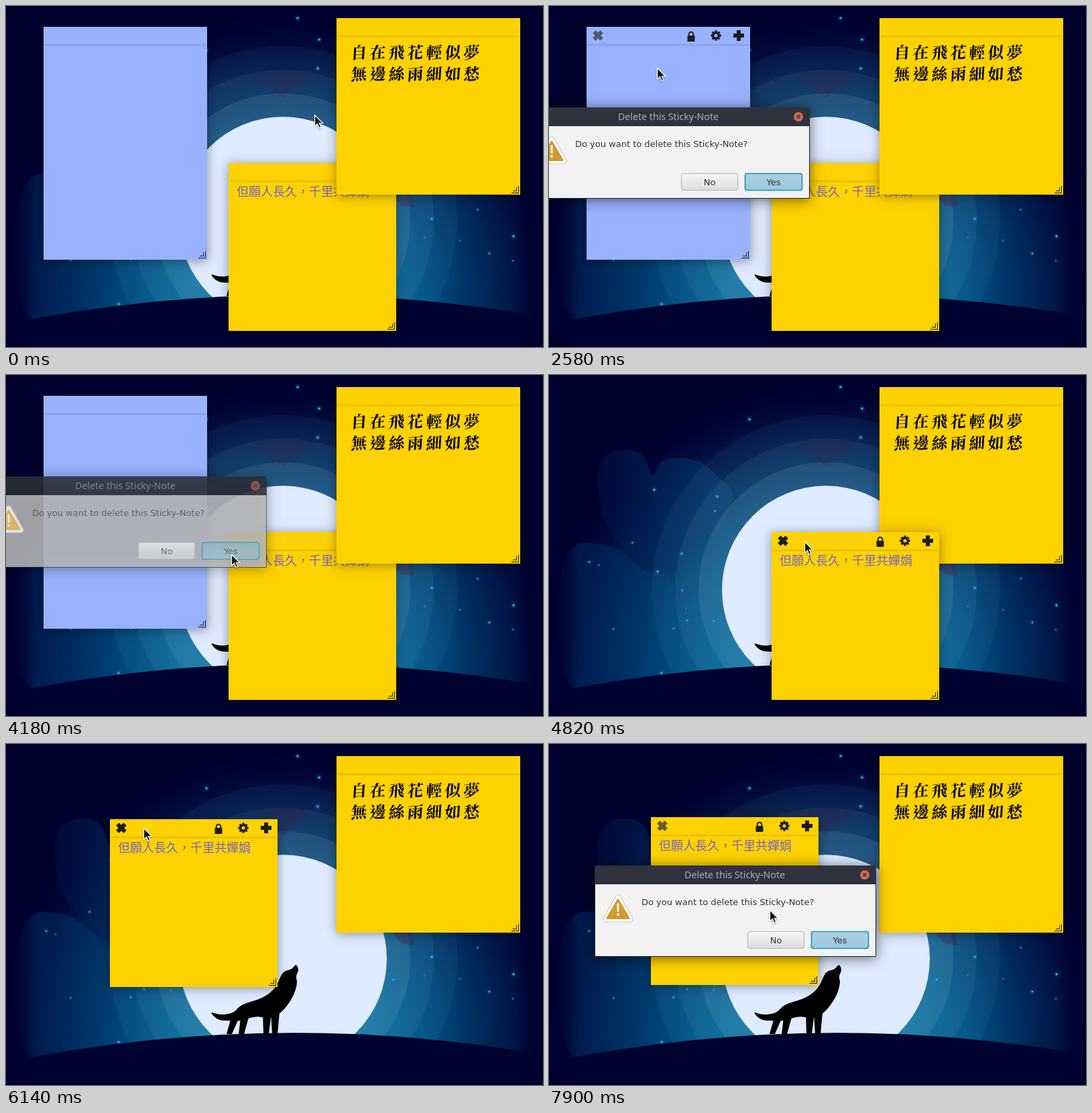
An HTML page with a canvas that plays this animation: 801x508 px, repeating every 8000 ms.

```html
<!DOCTYPE html>
<html lang="zh-Hant">
<head>
<meta charset="utf-8">
<title>Sticky notes</title>
<style>
html, body { margin: 0; width: 100%; height: 100%; overflow: hidden; background: #00002e; }
canvas { display: block; }
</style>
</head>
<body>
<canvas id="stage" width="801" height="508"></canvas>
<script>
const W = 801, H = 508, LOOP = 8000, INK = '#1d1d21', YELLOW = '#fed200';
const ctx = document.getElementById('stage').getContext('2d');

const clamp = v => Math.max(0, Math.min(1, v));
const ramp = (t, a, b) => clamp((t - a) / (b - a));
const ease = k => k * k * (3 - 2 * k);

// Each move is [start, end, x, y]; between moves the point rests
function follow([x, y], moves, t) {
  for (const [a, b, tx, ty] of moves) {
    const k = ease(ramp(t, a, b));
    x += (tx - x) * k;
    y += (ty - y) * k;
  }
  return [Math.round(x), Math.round(y)];
}

function randomizer(seed) {
  return () => (seed = (seed * 16807) % 2147483647) / 2147483647;
}

function poly(c, pts, fill) {
  c.beginPath();
  pts.forEach(([x, y]) => c.lineTo(x, y));
  c.closePath();
  c.fillStyle = fill;
  c.fill();
}

// Closed curve through the midpoints of the given corners
function blob(c, pts, fill) {
  const mid = (a, b) => [(a[0] + b[0]) / 2, (a[1] + b[1]) / 2];
  c.beginPath();
  c.moveTo(...mid(pts[pts.length - 1], pts[0]));
  pts.forEach((p, i) => c.quadraticCurveTo(...p, ...mid(p, pts[(i + 1) % pts.length])));
  c.fillStyle = fill;
  c.fill();
}

function disc(c, x, y, r, fill) {
  c.beginPath();
  c.arc(x, y, r, 0, Math.PI * 2);
  c.fillStyle = fill;
  c.fill();
}

function box(x, y, w, h, r, fill, stroke, line = 1) {
  ctx.beginPath();
  ctx.roundRect(x, y, w, h, r);
  ctx.fillStyle = fill;
  ctx.fill();
  if (!stroke) return;
  ctx.strokeStyle = stroke;
  ctx.lineWidth = line;
  ctx.stroke();
}

// Spread the colours evenly over a gradient
function blend(g, ...colors) {
  colors.forEach((col, i) => g.addColorStop(i / (colors.length - 1), col));
  return g;
}

function text(str, x, y, font, fill, align = 'left') {
  ctx.font = font;
  ctx.fillStyle = fill;
  ctx.textAlign = align;
  ctx.fillText(str, x, y);
}

function shadowed(alpha, blur, draw) {
  ctx.save();
  ctx.shadowColor = `rgba(0,0,0,${alpha})`;
  ctx.shadowBlur = blur;
  ctx.shadowOffsetY = 2;
  draw();
  ctx.restore();
}

function paintStars(c) {
  const star = (x, y, s) => {
    disc(c, x, y, s + 1.5, 'rgba(20,130,200,.25)');
    disc(c, x, y, 0.6 + s * 0.5, s > 1 ? '#28a8da' : '#1680b8');
  };
  [[435, 18], [467, 50], [299, 66], [465, 93], [157, 171], [251, 181], [198, 266],
    [162, 293], [168, 444], [635, 317], [578, 351], [757, 343]].forEach(p => star(...p, 2.4));
  const rnd = randomizer(41);
  for (let i = 0; i < 20; i++) {
    const side = i % 2 ? 560 : 60;
    star(side + rnd() * 200, 200 + rnd() * 200, 0.7 + rnd());
  }
}

function paintWolf(c) {
  blob(c, [
    [303, 398], [318, 404], [340, 401], [350, 388], [383, 379], [402, 364], [410, 345],
    [415, 338], [426, 336], [433, 327], [437, 337], [432, 346], [435, 356], [428, 378],
    [410, 402], [392, 409], [372, 405], [350, 413], [334, 412], [316, 412]
  ], '#000');
  // legs: hip x, foot x
  for (const [hip, foot] of [[345, 333], [358, 351], [390, 388], [402, 401]])
    poly(c, [[hip - 7, 400], [hip + 6, 400], [foot + 4, 432], [foot - 4, 432]], '#000');
}

function paintWallpaper() {
  const cv = document.createElement('canvas');
  cv.width = W;
  cv.height = H;
  const c = cv.getContext('2d');
  c.fillStyle = '#00002e';
  c.fillRect(0, 0, W, H);
  c.fillStyle = blend(c.createRadialGradient(413, 430, 0, 413, 430, 430),
    '#0084b4', '#007aab', '#006a9c', '#004f83', '#002e60', '#000f40', 'rgba(0,0,46,0)');
  c.fillRect(0, 0, W, H);

  blob(c, [[75, 210], [70, 115], [140, 108], [155, 160], [165, 122], [225, 125], [250, 150],
    [280, 175], [255, 230], [215, 245], [190, 300], [130, 305], [110, 260]],
    blend(c.createLinearGradient(70, 0, 270, 0), 'rgba(0,14,62,.6)', 'rgba(2,42,96,.6)', 'rgba(4,66,116,.6)'));
  blob(c, [[15, 500], [10, 250], [100, 250], [145, 300], [190, 290], [190, 480]],
    blend(c.createLinearGradient(15, 0, 190, 0), 'rgba(0,34,88,.6)', 'rgba(0,60,112,.4)', 'rgba(0,84,136,.2)'));

  for (const [r, a] of [[260, 0.08], [225, 0.11], [190, 0.2]])
    disc(c, 413, 320, r, `rgba(105,155,185,${a})`);
  poly(c, [[366, 97], [460, 97], [413, 137]], 'rgba(62,28,70,.25)');
  poly(c, [[575, 281], [606, 281], [610, 300], [590, 297]], 'rgba(70,35,75,.4)');
  disc(c, 413, 320, 155, '#dfebff');
  paintStars(c);

  c.beginPath();
  c.moveTo(0, 474);
  c.quadraticCurveTo(400.5, 392.5, W, 463);
  c.lineTo(W, H);
  c.lineTo(0, H);
  c.fillStyle = '#00022f';
  c.fill();
  paintWolf(c);

  for (const [x, far] of [[0, 45], [W, W - 40]]) {
    c.fillStyle = blend(c.createLinearGradient(x, 0, far, 0), '#00002e', 'rgba(0,0,46,.7)', 'rgba(0,0,46,0)');
    c.fillRect(Math.min(x, far), 0, 45, H);
  }
  return cv;
}

function cross(x, y, turn, fill) {
  ctx.save();
  ctx.translate(x, y);
  ctx.rotate(turn);
  ctx.beginPath();
  ctx.rect(-8, -3, 16, 6);
  ctx.rect(-3, -8, 6, 16);
  ctx.fillStyle = fill;
  ctx.fill();
  ctx.restore();
}

function lock(x, y) {
  box(x - 5.5, y - 1, 11, 9, 1, INK);
  ctx.beginPath();
  ctx.moveTo(x - 3.3, y);
  ctx.arc(x, y - 3, 3.3, Math.PI, 0);
  ctx.lineTo(x + 3.3, y);
  ctx.strokeStyle = INK;
  ctx.lineWidth = 2;
  ctx.stroke();
}

function gear(x, y) {
  ctx.save();
  ctx.translate(x, y);
  ctx.beginPath();
  ctx.arc(0, 0, 4.2, 0, Math.PI * 2);
  ctx.strokeStyle = ctx.fillStyle = INK;
  ctx.lineWidth = 3.2;
  ctx.stroke();
  for (let i = 0; i < 8; i++) {
    ctx.rotate(Math.PI / 4);
    ctx.fillRect(-1.7, -7.6, 3.4, 3);
  }
  ctx.restore();
}

function note(x, y, w, h, fill, icons, hot) {
  shadowed(0.38, 16, () => {
    ctx.fillStyle = fill;
    ctx.fillRect(x, y, w, h);
  });
  ctx.fillStyle = 'rgba(0,0,0,.04)';
  for (let i = 1; i < 4; i++) ctx.fillRect(x + 2, y + 26, w - 4, i);

  ctx.fillStyle = INK;
  for (const [size, gap] of [[11, 2], [6, 5]]) {
    const r = x + w - gap, b = y + h - gap;
    ctx.fillRect(r - 1, b - size, 1, size);
    ctx.fillRect(r - size, b - 1, size, 1);
  }
  if (!icons) return;
  cross(x + 17, y + 13, Math.PI / 4, hot ? 'rgba(60,60,62,.78)' : INK);
  lock(x + w - 88, y + 14);
  gear(x + w - 51, y + 13);
  cross(x + w - 17, y + 13, 0, INK);
}

function brushNote() {
  note(493, 18, 274, 263, YELLOW);
  ['自在飛花輕似夢', '無邊絲雨細如愁'].forEach((line, row) => {
    [...line].forEach((ch, i) => {
      ctx.save();
      ctx.translate(526 + i * 28, 78 + row * 32);
      ctx.transform(1, -0.08, -0.06, 1, 0, 0);
      text(ch, 0, 0, '600 24px "Noto Serif CJK TC", "Noto Sans CJK TC", serif', '#000', 'center');
      ctx.restore();
    });
  });
}

function poemNote(x, y, icons, hot) {
  note(x, y, 250, 250, YELLOW, icons, hot);
  text('但願人長久，千里共嬋娟', x + 12, y + 49, '18px "Noto Sans CJK SC", "Noto Sans CJK", sans-serif', '#7665c4');
}

function button(label, x, y, w, colors, edge, line) {
  box(x + 0.5, y + 0.5, w - 1, 25, 3, blend(ctx.createLinearGradient(0, y, 0, y + 26), ...colors), edge, line);
  text(label, x + w / 2, y + 18, '13px "DejaVu Sans", sans-serif', '#2e3436', 'center');
}

const YES = { idle: ['#abd1e3', '#9cc8dd'], hot: ['#c9e0ec', '#b0cfdf'], down: ['#86b4ca', '#9cc4d8'] };

function warning(x, y) {
  ctx.lineJoin = 'round';
  for (const [inset, color, line] of [[0, '#c4c4c4', 9], [0, '#fdfdfd', 7], [2, '#d19a2c', 3]]) {
    const half = 18 - inset, low = y + 16 - inset * 0.7;
    poly(ctx, [[x, y - 16 + inset * 1.6], [x + half, low], [x - half, low]], color);
    ctx.strokeStyle = color;
    ctx.lineWidth = line;
    ctx.stroke();
  }
  box(x - 1.5, y - 8, 3, 13, 1.5, '#fff');
  disc(ctx, x, y + 9, 1.9, '#fff');
}

function dialog(x, y, noHot, yes) {
  shadowed(0.55, 20, () => box(x, y, 420, 136, [4, 4, 0, 0], '#23252d'));
  box(x + 0.5, y, 419, 29, [4, 4, 0, 0], '#2f323d');
  ctx.fillStyle = '#f2f2f2';
  ctx.fillRect(x + 1, y + 28, 418, 107);

  text('Delete this Sticky-Note', x + 209, y + 19, '14.2px "Noto Sans", sans-serif', '#a9afb8', 'center');
  disc(ctx, x + 403, y + 14, 7, '#cc6a4c');
  ctx.strokeStyle = '#2f323d';
  ctx.lineWidth = 1.5;
  ctx.beginPath();
  for (const s of [-2.3, 2.3]) {
    ctx.moveTo(x + 400.7, y + 14 - s);
    ctx.lineTo(x + 405.3, y + 14 + s);
  }
  ctx.stroke();

  warning(x + 35, y + 64);
  text('Do you want to delete this Sticky-Note?', x + 70, y + 59, '13px "DejaVu Sans", sans-serif', '#2e3436');
  button('No', x + 228, y + 98, 85, noHot ? ['#fff', '#ececec'] : ['#f7f7f7', '#dcdcdc'], '#b2b2b2', 1);
  button('Yes', x + 323, y + 98, 86, YES[yes], '#1793b8', 1.6);
}

function pointer(x, y) {
  shadowed(0.35, 3, () => {
    ctx.translate(x - 0.5, y - 0.5);
    poly(ctx, [[0, 0], [0, 16.5], [4, 13], [6.5, 19], [9.3, 17.8], [6.8, 12], [12, 12]], '#141414');
    ctx.shadowColor = 'transparent';
    ctx.lineJoin = 'miter';
    ctx.strokeStyle = '#fff';
    ctx.lineWidth = 1.2;
    ctx.stroke();
  });
}

const MOUSE = [
  [480, 1400, 83, 43], [2440, 2860, 386, 235], [2860, 3280, 276, 247], [3280, 3600, 337, 268],
  [4600, 4800, 382, 249], [5600, 5900, 357, 243], [5900, 6160, 203, 124],
  [6340, 6860, 165, 125], [7640, 7900, 330, 248]
];
const DRAG = [[5540, 5900, 249, 199], [5900, 6170, 152, 109]];

const wallpaper = paintWallpaper();

function faded(alpha, draw) {
  if (alpha <= 0) return;
  ctx.globalAlpha = alpha;
  draw();
  ctx.globalAlpha = 1;
}

function render(t) {
  const [mx, my] = follow([461, 163], MOUSE, t);
  const poem = () => poemNote(...follow([332, 234], DRAG, t), t >= 4720, t >= 6700);
  ctx.drawImage(wallpaper, 0, 0);

  const stack = [poem, brushNote];
  if (t >= 4320) stack.reverse();
  stack.forEach(draw => draw());

  faded(1 - ramp(t, 4240, 4540), () =>
    note(56, 31, 244, 347, '#99b2ff', mx < 300, t >= 1400));

  if (t >= 2160) faded(1 - ramp(t, 4120, 4280), () => {
    const onRow = my > 249 && my < 275;
    const yes = t >= 3920 ? 'down' : onRow && mx > 291 ? 'hot' : 'idle';
    dialog(-31, 151, onRow && mx > 197 && mx < 282, yes);
  });
  faded(ramp(t, 7260, 7480), () => dialog(68, 181, false, 'idle'));
  pointer(mx, my);
}

function tick() {
  const t = performance.now() % LOOP;
  render(Math.floor(t / 20) * 20);
  requestAnimationFrame(tick);
}
tick();
</script>
</body>
</html>
```
